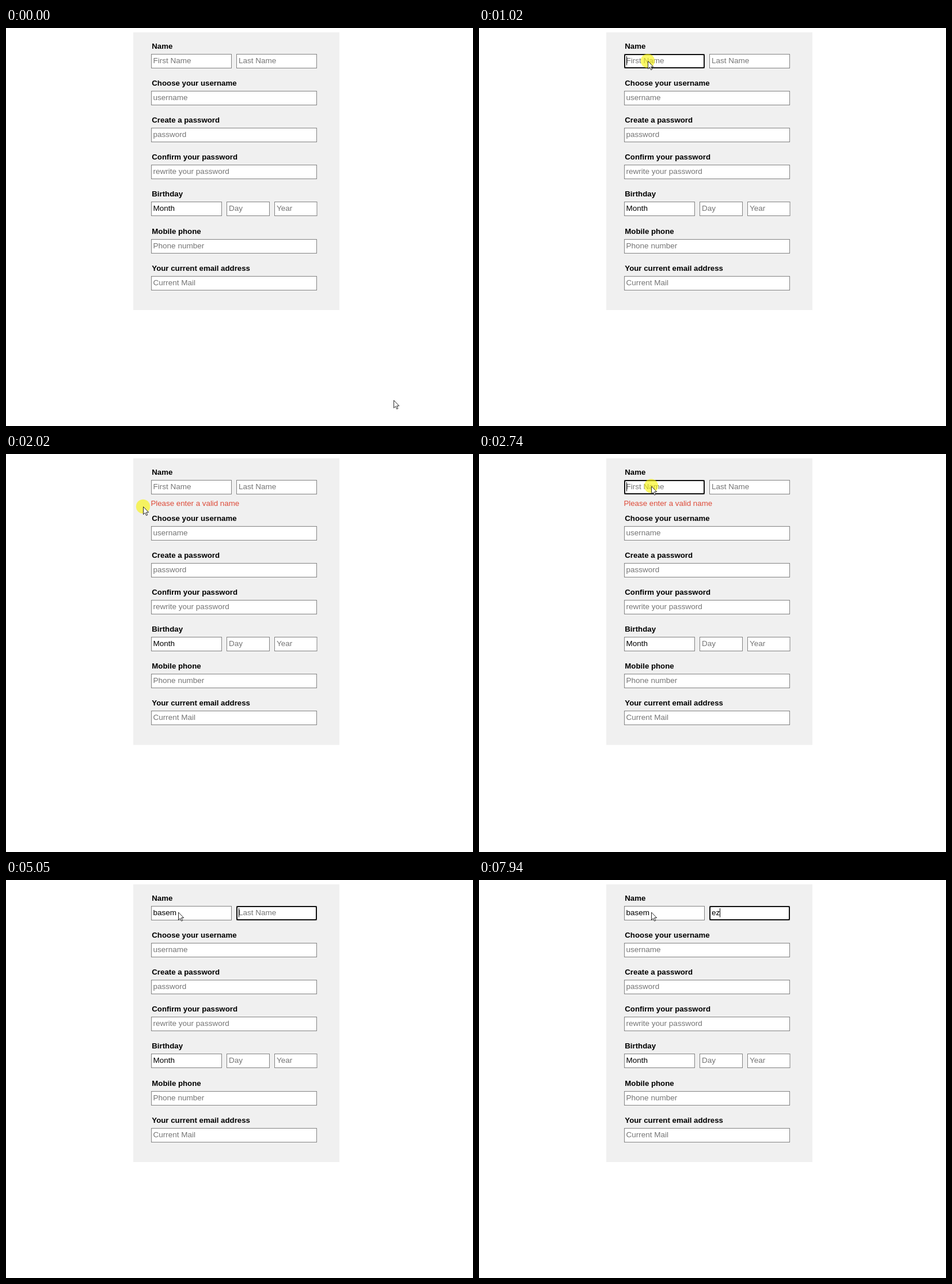
These frames come from a looping animation (811x690 px, 8000 ms). An HTML page:

```html
<!DOCTYPE html>
<html lang="en">
<head>
<meta charset="utf-8">
<title>Sign-up form</title>
<style>
  html, body { margin: 0; width: 100%; height: 100%; overflow: hidden; background: #fff; }
  svg { display: block; width: 811px; height: 690px; font: 13.5px "Liberation Sans", Arial, sans-serif; }
  .label { font-size: 13.25px; font-weight: bold; }
  .error { font-size: 13.3px; fill: #dd4b39; }
  .box { fill: #fff; stroke: #828282; }
  .hover .box { stroke: #b2b2b2; }
  .shade { fill: none; stroke: #000; stroke-opacity: .08; display: none; }
  .hover .shade { display: inline; }
  .ring { fill: none; stroke: #101010; stroke-width: 2; display: none; }
  .focus:not(.hover) .ring { display: inline; }
  .hint { fill: #757575; }
</style>
</head>
<body>
<svg id="stage" viewBox="0 0 811 690"></svg>
<script>
const LOOP = 8000;
const TOP = 45, PITCH = 64.1, FIELD_H = 25, SHIFT = 15.4;
const stage = document.getElementById('stage');

function add(tag, attrs, parent = stage, text = '') {
  const el = document.createElementNS('http://www.w3.org/2000/svg', tag);
  for (const key in attrs) el.setAttribute(key, attrs[key]);
  el.textContent = text;
  parent.appendChild(el);
  return el;
}
const show = (el, on) => el.setAttribute('visibility', on ? 'visible' : 'hidden');
const move = (el, x, y) => el.setAttribute('transform', `translate(${x} ${y})`);

// Each field: left, width, hint, and whether it is a drop-down list.
const rows = [
  ['Name', [[252, 140, 'First Name'], [400, 140, 'Last Name']]],
  ['Choose your username', [[252, 288, 'username']]],
  ['Create a password', [[252, 288, 'password']]],
  ['Confirm your password', [[252, 288, 'rewrite your password']]],
  ['Birthday', [[252, 123, 'Month', true], [383, 75, 'Day'], [466, 74.5, 'Year']]],
  ['Mobile phone', [[252, 288, 'Phone number']]],
  ['Your current email address', [[252, 288, 'Current Mail']]]
];

const panel = add('rect', { x: 221, y: 7.5, width: 358, height: 481.5, fill: '#f0f0f0' });
const error = add('text', { class: 'error', x: 251.4, y: 90.3 }, stage, 'Please enter a valid name');
const fields = [];

const rowGroups = rows.map(([label, items]) => {
  const group = add('g', {});
  add('text', { class: 'label', x: 253.3, y: -9 }, group, label);
  for (const [x, w, hint, list] of items) {
    const el = add('g', {}, group);
    add('rect', { class: 'box', x: x + .5, y: .5, width: w - 1, height: FIELD_H - 1 }, el);
    add('path', { class: 'shade', d: `M${x + 1} 1.5h${w - 2}M${x + 1} 2.5h${w - 2}M${x + 1.5} 1v23M${x + w - 1.5} 1v23` }, el);
    add('rect', { class: 'ring', x: x + 1, y: 1, width: w - 2, height: FIELD_H - 2, rx: 2 }, el);
    const textX = x + (x === 252 ? 3.6 : 4);
    const text = add('text', { class: list ? '' : 'hint', x: textX, y: 16 }, el, hint);
    fields.push({ el, text, textX, x, w, hint, list, row: rowGroupsIndex() });
  }
  return group;
});
function rowGroupsIndex() {
  return rows.findIndex(([, items]) => items.some(item => item[2] === stage.lastChild.querySelector('g:last-child text').textContent));
}

const caret = add('rect', { y: 49, width: 1, height: 15.5 });
const glow = add('circle', { r: 12.2, fill: '#f8f400', 'fill-opacity': .6 });
const arrow = add('path', {
  d: 'M.5 .5V13.8L3.5 10.9L5.6 15.6L7.7 14.7L5.7 10.1H9.7Z',
  fill: '#fff', stroke: '#111', 'stroke-width': .9
});
const beam = add('path', {
  d: 'M-2.5 -6.3H-.7L0 -5.6L.7 -6.3H2.5M-2.5 6.3H-.7L0 5.6L.7 6.3H2.5M0 -5.6V5.6',
  fill: 'none', stroke: '#222', 'stroke-width': 1
});

// Pointer moves: first and last step time, number of steps, end point.
const rest = [673, 645];
const moves = [
  [180, 870, 10, [293, 57]],
  [1560, 1870, 5, [238, 91]],
  [2340, 2570, 4, [299, 55.5]]
];
const clicks = [[1020, 1250], [2020, 2190], [2740, 2970]];
const caretOn = [[1020, 1560], [2740, 3270], [3670, 4670], [5050, 5600], [5920, 7400], [7860, LOOP]];

// Text edits: time and resulting length.
const typing = [
  { word: 'basem', edits: [[3670, 1], [3750, 2], [3900, 3], [3980, 4], [4130, 5]] },
  { word: 'ezbari', edits: [[5920, 1], [6070, 2], [6220, 3], [6700, 4], [6775, 5], [6850, 6],
    [7400, 5], [7550, 4], [7630, 3], [7940, 2]] }
];

const within = (t, spans) => spans.some(([a, b]) => t >= a && t < b);
const ease = p => p * p * (3 - 2 * p);

function pointerAt(t) {
  let from = rest;
  for (const [start, end, steps, to] of moves) {
    if (t < start) break;
    const done = Math.min(steps, 1 + Math.floor((t - start) / (end - start) * (steps - 1) + 1e-6));
    const p = ease(done / steps);
    const at = from.map((v, i) => v + (to[i] - v) * p);
    if (done < steps) return at;
    from = to;
  }
  return from;
}

function focusAt(t) {
  if (t >= 5050) return 1;
  return within(t, [[1020, 2020], [2740, 5050]]) ? 0 : -1;
}

function draw(t) {
  const invalid = t >= 2020 && t < 5050;
  const shift = invalid ? SHIFT : 0;
  const focus = focusAt(t);
  const [px, py] = pointerAt(t);

  panel.setAttribute('height', 481.5 + shift);
  show(error, invalid);
  const tops = rowGroups.map((group, i) => {
    const y = Math.round(TOP + PITCH * i + (i ? shift : 0));
    move(group, 0, y);
    return y;
  });

  typing.forEach(({ word, edits }, i) => {
    let length = 0;
    for (const [time, n] of edits) if (t >= time) length = n;
    const { text, hint } = fields[i];
    text.textContent = length ? word.slice(0, length) : hint;
    text.setAttribute('class', length ? '' : 'hint');
    if (i === focus) {
      const width = length ? text.getComputedTextLength() : 0;
      caret.setAttribute('x', Math.floor(fields[i].textX + .4 + width));
    }
  });

  let overText = false;
  fields.forEach((f, i) => {
    const y = tops[f.row];
    const hover = px >= f.x && px < f.x + f.w && py >= y && py < y + FIELD_H;
    if (hover && !f.list) overText = true;
    f.el.setAttribute('class', (hover ? 'hover ' : '') + (i === focus ? 'focus' : ''));
  });

  show(caret, within(t, caretOn));
  show(glow, within(t, clicks));
  move(glow, px, py);
  show(arrow, !overText);
  move(arrow, px, py);
  show(beam, overText);
  move(beam, px + 1.7, py + .5);
}

function tick() {
  draw(performance.now() % LOOP);
  requestAnimationFrame(tick);
}
tick();
</script>
</body>
</html>
```
